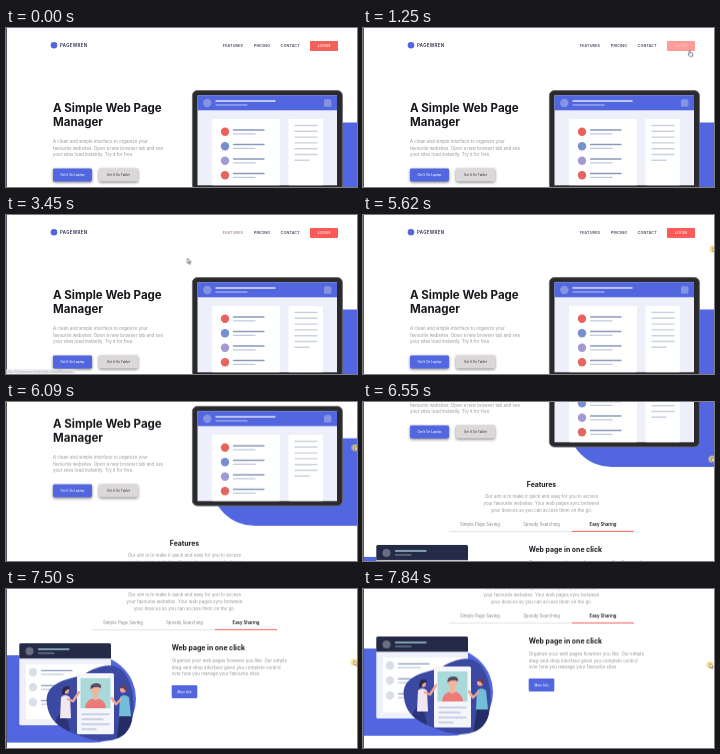
These frames come from a looping animation (351x159 px, 8 s). An HTML page:

```html
<!DOCTYPE html>
<html lang="en">
<head>
<meta charset="utf-8">
<title>Landing page walkthrough</title>
<style>
html, body { margin: 0; width: 100%; height: 100%; overflow: hidden; background: #fff; }
svg { display: block; width: 100%; height: 100%; }
text { font-family: Inter, Roboto, sans-serif; }
.mid { text-anchor: middle; }
.h1 { font-size: 11.5px; font-weight: 700; fill: #16161c; }
.h2 { font-size: 6.9px; font-weight: 700; fill: #16161c; }
.copy { font-size: 4.45px; fill: #96969c; }
.tab { font-size: 4.25px; fill: #85858c; }
.nav { font-size: 3.75px; font-weight: 500; letter-spacing: .15px; fill: #252b46; }
.brand { font-size: 4.4px; font-weight: 600; letter-spacing: .33px; fill: #252b46; }
.btn { font-size: 3.1px; font-weight: 500; fill: #fff; }
.shadow { filter: drop-shadow(0 1px 1.4px rgba(0, 0, 0, .5)); }

/* 8 s loop: 1% is 80 ms */
.page, .cursor, .arrow, .hand, .halo, .status, .login, .loginText, .contact, .pricing, .features {
  animation: 8s linear infinite;
}
.page { animation-name: scroll; }
.cursor { animation-name: move; }
.arrow { animation-name: arrow; animation-timing-function: step-end; }
.hand { animation-name: hand; animation-timing-function: step-end; }
.halo { animation-name: halo; animation-timing-function: step-end; }
.status { animation-name: status; }
.login { animation-name: login; }
.loginText { animation-name: loginText; }
.contact { animation-name: contact; }
.pricing { animation-name: pricing; }
.features { animation-name: features; }

@keyframes scroll {
  0%, 70.25% { transform: translateY(0); }
  72.5% { transform: translateY(-16px); }
  80.25% { transform: translateY(-106px); }
  81.875% { transform: translateY(-117px); }
  88.625% { transform: translateY(-184px); }
  92% { transform: translateY(-203px); }
  98%, 100% { transform: translateY(-212.5px); }
}
@keyframes move {
  0%, 7.87% { transform: translate(360px, 42px); }
  7.88% { transform: translate(348px, 42.5px); }
  9.6% { transform: translate(352px, 44px); }
  12% { transform: translate(352px, 44px); }
  15.6% { transform: translate(326px, 22.5px); }
  23% { transform: translate(322px, 20px); }
  27.5% { transform: translate(287px, 18px); }
  32% { transform: translate(280px, 18px); }
  35% { transform: translate(257px, 18px); }
  39% { transform: translate(231px, 18px); }
  41% { transform: translate(218px, 20px); }
  43.1% { transform: translate(181px, 43px); }
  50.1%, 52.6% { transform: translate(258px, 111px); }
  58.6% { transform: translate(352px, 51px); }
  58.7%, 70.24% { transform: translate(370px, 40px); }
  70.25% { transform: translate(350px, 34px); }
  81.875% { transform: translate(349px, 57px); }
  88.625% { transform: translate(350px, 70px); }
  98%, 100% { transform: translate(347px, 76px); }
}
@keyframes arrow {
  0% { opacity: 1; }
  15% { opacity: 0; }
  41.3% { opacity: 1; }
  70.2%, 100% { opacity: 0; }
}
@keyframes hand {
  0% { opacity: 0; }
  15% { opacity: 1; }
  41.3%, 100% { opacity: 0; }
}
@keyframes halo {
  0% { opacity: 0; }
  70.2%, 100% { opacity: 1; }
}
@keyframes status {
  0%, 16% { opacity: 0; }
  18%, 42.3% { opacity: 1; }
  43.1% { opacity: .65; }
  45%, 100% { opacity: 0; }
}
@keyframes login {
  0%, 14.4% { fill: #f2625b; }
  15.6%, 24% { fill: #ff9b99; }
  27%, 100% { fill: #fb5a57; }
}
@keyframes loginText {
  0%, 14.4% { fill: #fff; }
  15.6%, 24% { fill: #ffc7c4; }
  27%, 100% { fill: #fff; }
}
@keyframes contact {
  0%, 26% { fill: #252b46; }
  28%, 32% { fill: #fa5959; }
  34.5%, 100% { fill: #252b46; }
}
@keyframes pricing {
  0%, 33% { fill: #252b46; }
  34.5%, 36.5% { fill: #fa5959; }
  39%, 100% { fill: #252b46; }
}
@keyframes features {
  0%, 37.3% { fill: #252b46; }
  39%, 41.2% { fill: #fa5959; }
  43.1% { fill: #96767f; }
  45.5%, 100% { fill: #252b46; }
}
</style>
</head>
<body>
<svg viewBox="0 0 351 159" preserveAspectRatio="none">
  <defs>
    <g id="row" stroke-width="1.3" stroke-linecap="round">
      <circle r="4.2" stroke="none"/>
      <path d="M8.5-1.7H39" stroke="#8b9ab9"/>
      <path d="M8.5 2.2H30" stroke="#c0cadb"/>
    </g>
    <path id="blob" d="M41 321C38 302 55 297 76 292C92 282 108 278 117 288C128 300 131 327 124 343C117 359 96 361 78 354C58 347 43 340 41 321Z"/>
    <clipPath id="blobClip"><use href="#blob"/></clipPath>
  </defs>

  <g class="page">
    <!-- header -->
    <circle cx="48" cy="17.3" r="3.3" fill="#5267df"/>
    <text class="brand" x="54" y="18.9">PAGEWREN</text>
    <text class="nav mid features" x="227" y="18.9">FEATURES</text>
    <text class="nav mid pricing" x="256" y="18.9">PRICING</text>
    <text class="nav mid contact" x="284.2" y="18.9">CONTACT</text>
    <rect class="login" x="304" y="13" width="28" height="10" rx=".8"/>
    <text class="nav mid loginText" x="318" y="19.2">LOGIN</text>

    <!-- hero -->
    <text class="h1" x="47" y="83.7">A Simple Web Page</text>
    <text class="h1" x="47" y="97.6">Manager</text>
    <g class="copy">
      <text x="47" y="115">A clean and simple interface to organize your</text>
      <text x="47" y="121.6">favourite websites. Open a new browser tab and see</text>
      <text x="47" y="128.2">your sites load instantly. Try it for free.</text>
    </g>
    <g class="shadow">
      <rect x="47" y="140.5" width="39" height="13" rx="1.4" fill="#5267df"/>
      <rect x="93" y="140.5" width="39" height="13" rx="1.4" fill="#dcd8d9"/>
    </g>
    <text class="btn mid" x="66.5" y="148.1">Get It On Laptop</text>
    <text class="btn mid" x="112.5" y="148.1" style="fill:#4b4044">Get It On Tablet</text>

    <rect x="205" y="94.5" width="190" height="87.5" rx="43.7" fill="#5267df"/>
    <rect x="186.4" y="62.6" width="150" height="99.4" rx="5" fill="#2a2a2d" stroke="#68686d" stroke-width=".9"/>
    <rect x="191.5" y="67.3" width="139.5" height="90" fill="#edf0fa"/>
    <rect x="191.5" y="67.3" width="139.5" height="15" fill="#5267df"/>
    <circle cx="201.3" cy="75" r="4.2" fill="#8593e3"/>
    <g stroke-linecap="round" stroke-width="1.4">
      <path d="M210 73H269" stroke="#dfe4fb"/>
      <path d="M210 77H241" stroke="#99a6ec"/>
    </g>
    <rect x="318" y="71.3" width="7.4" height="7.4" rx="1.5" fill="#8593e3"/>
    <rect x="206" y="91" width="68" height="66.3" rx="1" fill="#fff"/>
    <rect x="282.5" y="91" width="34.5" height="66.3" rx="1" fill="#fff"/>
    <use href="#row" x="219" y="103.7" fill="#ea625d"/>
    <use href="#row" x="219" y="118.2" fill="#7590cd"/>
    <use href="#row" x="219" y="132.7" fill="#a29ad5"/>
    <use href="#row" x="219" y="147.2" fill="#e36661"/>
    <path d="M289 97.5H311M289 103.3H311M289 109.1H311M289 114.9H311M289 120.7H311M289 126.5H311M289 132.3H303" stroke="#cbd1de" stroke-width="1.4" stroke-linecap="round"/>

    <!-- features -->
    <text class="h2 mid" x="178.5" y="201.5">Features</text>
    <g class="copy mid">
      <text x="178.5" y="213.2">Our aim is to make it quick and easy for you to access</text>
      <text x="178.5" y="219.9">your favourite websites. Your web pages sync between</text>
      <text x="178.5" y="226.6">your devices so you can access them on the go.</text>
    </g>
    <text class="tab mid" x="117" y="240.6">Simple Page Saving</text>
    <text class="tab mid" x="178.5" y="240.6">Speedy Searching</text>
    <text class="tab mid" x="240" y="240.6" style="fill:#16161c;font-weight:600">Easy Sharing</text>
    <path d="M86 246.6H271" stroke="#c9c5c9" stroke-width=".5"/>
    <path d="M209 246.4H271" stroke="#f2645f" stroke-width="1"/>

    <!-- illustration -->
    <rect x="-60" y="272" width="190" height="87.5" rx="43.7" fill="#5267df"/>
    <rect x="13.3" y="260" width="91.7" height="82" rx="1.5" fill="#eef1fa"/>
    <path d="M13.3 275.3V261.5Q13.3 260 14.8 260H103.5Q105 260 105 261.5V275.3Z" fill="#252b46"/>
    <circle cx="23.5" cy="268" r="4" fill="#6b6e80"/>
    <g stroke-linecap="round" stroke-width="1.3">
      <path d="M32.5 266H63" stroke="#9fc3d3"/>
      <path d="M32.5 270H48" stroke="#697489"/>
    </g>
    <rect x="20" y="281" width="78" height="55" fill="#fff"/>
    <g fill="#d9deea">
      <use href="#row" x="27" y="289"/>
      <use href="#row" x="27" y="304"/>
      <use href="#row" x="27" y="319"/>
    </g>
    <use href="#blob" fill="#3c49a3"/>
    <g clip-path="url(#blobClip)">
      <path d="M47 360Q46 339 54 330L62 337L66 360Z" fill="#2b3478"/>
      <path d="M110 360L114 330H125L128 360Z" fill="#252d67"/>
    </g>
    <!-- card -->
    <rect x="71" y="290" width="37" height="61" rx="1.5" fill="#f5f6fc"/>
    <rect x="74.5" y="295" width="30" height="30" fill="#a9d9d8"/>
    <path d="M79 325Q80 315 89.5 315T100 325Z" fill="#ec7b78"/>
    <path d="M87 309H92V316Q89.5 318 87 316Z" fill="#f1b59e"/>
    <circle cx="89.5" cy="306.5" r="4.7" fill="#f1b59e"/>
    <path d="M84.4 306Q84 300 90 300T95 305Q90 302 84.4 306Z" fill="#594764"/>
    <path d="M76 331H103M76 336H97M76 341H103M76 346H90" stroke="#bcc5dc" stroke-width="1.4" stroke-linecap="round"/>
    <!-- helpers -->
    <path d="M54 335L55 314Q59 310 64 314L65 335Z" fill="#f2e7ee"/>
    <path d="M62 316L67 318L73 309" fill="none" stroke="#eda793" stroke-width="2.4" stroke-linecap="round" stroke-linejoin="round"/>
    <circle cx="60" cy="307.5" r="3" fill="#eda793"/>
    <path d="M56.2 311Q55.5 303 60.5 303T63 306Q59 306 58.5 311Z" fill="#2b2746"/>
    <path d="M113 333L114 314Q118 310 123 314L125 333Z" fill="#72bdd8"/>
    <path d="M115 316L110 321L106 315" fill="none" stroke="#eda793" stroke-width="2.4" stroke-linecap="round" stroke-linejoin="round"/>
    <circle cx="117" cy="306.5" r="3" fill="#eda793"/>
    <path d="M114 305Q115 302 118 302.5T120.5 308Q118 307 117.5 305Z" fill="#7a3844"/>

    <text class="h2" x="165.7" y="266.6">Web page in one click</text>
    <g class="copy">
      <text x="165.7" y="278.9">Organize your web pages however you like. Our simple</text>
      <text x="165.7" y="285.6">drag-and-drop interface gives you complete control</text>
      <text x="165.7" y="292.3">over how you manage your favourite sites.</text>
    </g>
    <rect x="165.7" y="302" width="25.6" height="13" rx="1.2" fill="#5267df"/>
    <text class="btn mid" x="178.5" y="309.6">More Info</text>
  </g>

  <rect width="1" height="159" fill="#57556c"/>

  <g class="status">
    <rect y="154" width="70" height="5" fill="#e3e4e7"/>
    <text x="2" y="157.7" font-size="3.3" fill="#777980">file:///home/user/site/index.html#features</text>
  </g>

  <g class="cursor">
    <circle class="halo" r="3.6" fill="#f5d56a" fill-opacity=".75"/>
    <path class="halo" d="M0-1.5V3L1.1 2L2 4L2.8 3.6L2 1.7H3.4Z" fill="#fff" stroke="#6d5a45" stroke-width=".5"/>
    <path class="arrow" d="M0 0V5L1.2 3.9L2.1 6L3 5.6L2.1 3.6H3.7Z" fill="#fff" stroke="#33333a" stroke-width=".6"/>
    <path class="hand" d="M0 .5Q.6-.2 1.2 .5V2.3L3.6 2.8Q4 3 3.9 3.6L3.4 6H.7L-1 3.7Q-.9 2.9 0 3.6Z" fill="#fff" stroke="#33333a" stroke-width=".6"/>
  </g>
</svg>
</body>
</html>
```
